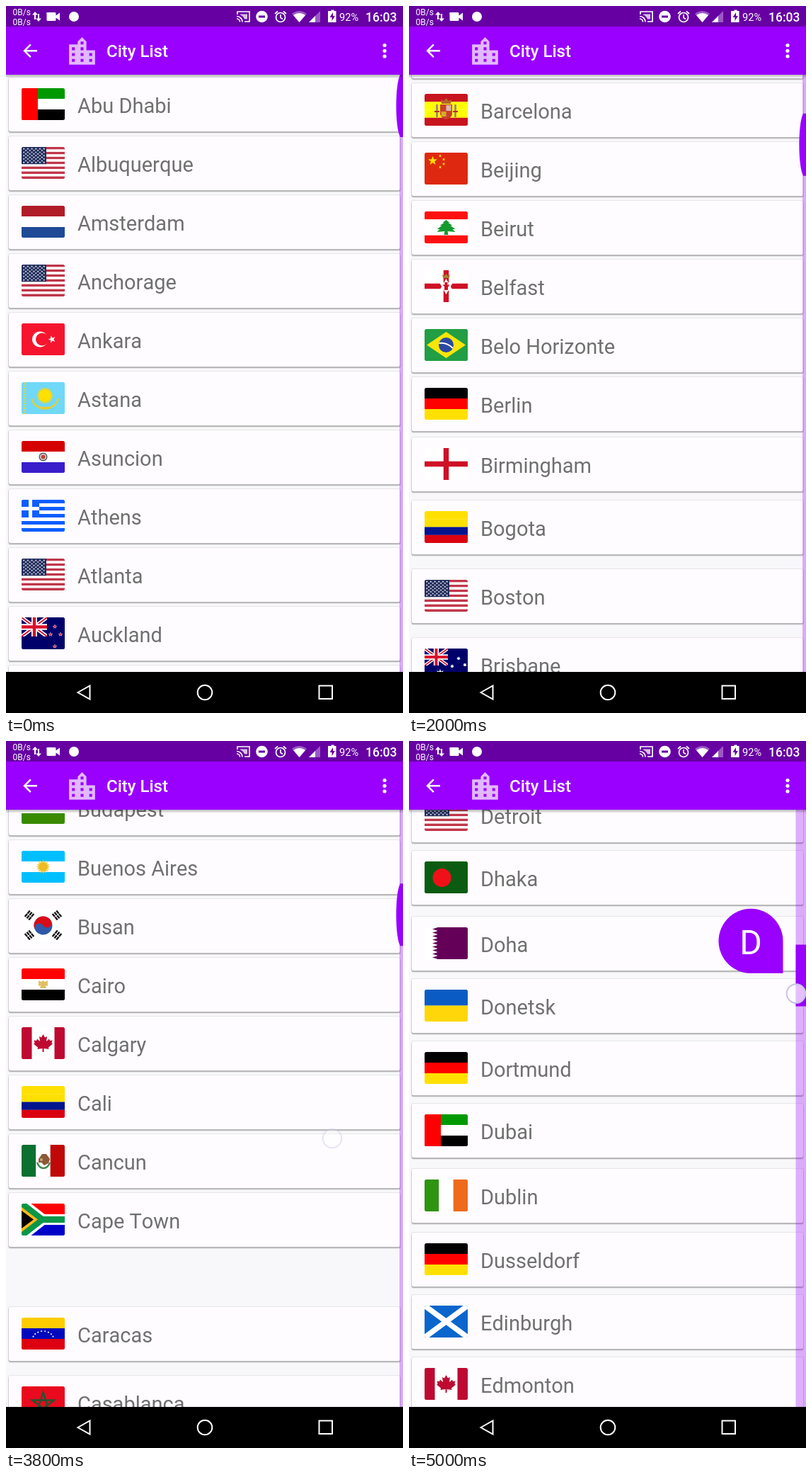
Recreate the animation shown at these times as an HTML page. Size 561 by 998 pixels, loop 5100 ms.

```html
<!DOCTYPE html>
<html lang="en">
<head>
<meta charset="utf-8">
<title>City List</title>
<style>
html, body { margin: 0; width: 100%; height: 100%; overflow: hidden; background: #f8f7f9; }
svg { display: block; }
#stage { width: 561px; height: 998px; }
text { font-family: Roboto, sans-serif; font-kerning: none; }
</style>
</head>
<body>
<svg id="stage" viewBox="0 0 561 998">
  <defs>
    <clipPath id="flagClip"><rect width="61" height="45" rx="2.5"/></clipPath>
    <linearGradient id="barShade" x2="0" y2="1">
      <stop stop-color="#000" stop-opacity=".28"/><stop offset="1" stop-color="#000" stop-opacity="0"/>
    </linearGradient>
  </defs>
  <rect width="561" height="998" fill="#f8f7f9"/>
  <g id="list"></g>
  <rect id="track" y="97" height="843" fill="#9900ff" opacity=".31"/>
  <path id="handle" fill="#9900ff"/>
  <g id="bubble">
    <path d="M91 91H45.5A45.5 45.5 0 1 1 91 45.5z" fill="#9900ff"/>
    <text id="letter" x="45.5" y="64" font-size="48" fill="#fff" text-anchor="middle"></text>
  </g>
  <circle id="touch" r="13.3" fill="#fff" fill-opacity=".75" stroke="#c9c0e6" stroke-width="2"/>

  <rect y="97" width="561" height="5" fill="url(#barShade)"/>
  <rect width="561" height="29" fill="#6600a3"/>
  <rect y="29" width="561" height="68" fill="#9900ff"/>
  <g fill="#fff">
    <g font-size="12"><text x="9.5" y="13">0B/s</text><text x="9.5" y="27">0B/s</text></g>
    <path d="M41 8l4 4.500h-3V19h-2v-6.500h-3zM46 22l-4-4.500h3V11h2v6.500h3z"/>
    <path d="M59 9h10a1.500 1.500 0 0 1 1.500 1.500v3l5.500-4v11l-5.500-4v3a1.500 1.500 0 0 1-1.500 1.500H59a1.500 1.500 0 0 1-1.500-1.500v-8A1.500 1.500 0 0 1 59 9z"/>
    <circle cx="96" cy="15" r="7"/>
    <g fill="none" stroke="#fff" stroke-width="1.7">
      <path d="M327 12V8h17v14h-7M326 14.500a8 8 0 0 1 8 8M326 18a4.500 4.500 0 0 1 4.500 4.500"/>
      <circle cx="388" cy="16" r="6.500"/><path d="M388 12v4.500l3 2M380 11l4-3.500M396 11l-4-3.500"/>
    </g>
    <path d="M331 11.500h10v7h-4a11 11 0 0 0-6-6z" opacity=".75"/>
    <circle cx="361.500" cy="15" r="8.300"/><rect x="357" y="13.500" width="9" height="3" fill="#6600a3"/>
    <path d="M404 11q10.500-8 21 0L414.500 23z" opacity=".35"/><path d="M406 13q8.500-6 17 0l-8.500 10z"/>
    <path d="M444 7v16h-16z" opacity=".35"/><path d="M437 14v9h-9z"/>
    <path d="M458 7h1.500V5.500h4V7h3v16H455V7z"/><path d="M462 9l-4.500 7h3v5l4.500-7h-3z" fill="#6600a3"/>
    <text x="471" y="20.500" font-size="14.600">92%</text>
    <text x="508" y="21.500" font-size="17.500" font-weight="500">16:03</text>
    <path d="M44 62v2.400H29l6.700 6.800-1.700 1.700L24.300 63.200 34 53.500l1.700 1.700L29 62z"/>
    <path transform="translate(83 40) scale(2.040)" opacity=".72" d="M15 11V5l-3-3-3 3v2H3v14h18V11zM7 19H5v-2h2zm0-4H5v-2h2zm0-4H5V9h2zm6 8h-2v-2h2zm0-4h-2v-2h2zm0-4h-2V9h2zm0-4h-2V5h2zm6 12h-2v-2h2zm0-4h-2v-2h2z"/>
    <text x="142" y="71.500" font-size="24" font-weight="500">City List</text>
    <circle cx="535" cy="55.500" r="2.600"/><circle cx="535" cy="63.300" r="2.600"/><circle cx="535" cy="71" r="2.600"/>
  </g>
  <rect y="940" width="561" height="58"/>
  <g fill="none" stroke="#fff" stroke-width="2">
    <path d="M101.500 969L118.500 959.500v19z"/><circle cx="281" cy="969" r="10.300"/><rect x="442.500" y="959.500" width="18.500" height="18.500"/>
  </g>
</svg>
<script>
const $ = id => document.getElementById(id);
const W = 61, H = 45;

// Drawing helpers for flags on a 61 x 45 field
const rect = (x, y, w, h, fill) => `<rect x="${x}" y="${y}" width="${w}" height="${h}" fill="${fill}"/>`;
const disc = (x, y, r, fill) => `<circle cx="${x}" cy="${y}" r="${r}" fill="${fill}"/>`;
const path = (d, fill) => `<path d="${d}" fill="${fill}"/>`;
const line = (d, color, width, dash = 'none') => `<path d="${d}" fill="none" stroke="${color}" stroke-width="${width}" stroke-dasharray="${dash}"/>`;
const rows = (...c) => c.map((f, i) => rect(0, i * H / c.length, W, H / c.length + .1, f)).join('');
const cols = (...c) => c.map((f, i) => rect(i * W / c.length, 0, W / c.length + .1, H, f)).join('');
const repeat = (n, fn) => Array.from({ length: n }, (_, i) => fn(i)).join('');
const stripes = (n, a, b) => rows(...Array.from({ length: n }, (_, i) => i % 2 ? b : a));
function star(x, y, r, fill, points = 5, inner = .4, turn = -90) {
  const d = repeat(points * 2, i => {
    const a = turn * Math.PI / 180 + i * Math.PI / points, k = i % 2 ? r * inner : r;
    return `${i ? 'L' : 'M'}${(x + k * Math.cos(a)).toFixed(2)} ${(y + k * Math.sin(a)).toFixed(2)}`;
  });
  return path(d + 'z', fill);
}
const crescent = bg => disc(26, 22.5, 11, '#fff') + disc(29, 22.5, 9, bg);
const jack = (w, h) => `<svg width="${w}" height="${h}" viewBox="0 0 36 26" preserveAspectRatio="none">` +
  rect(0, 0, 36, 26, '#00006a') + line('M0 0L36 26M36 0L0 26', '#fff', 5) + line('M0 0L36 26M36 0L0 26', '#d8102c', 1.8) +
  line('M18 0V26M0 13H36', '#fff', 8) + line('M18 0V26M0 13H36', '#d8102c', 4.4) + '</svg>';
const cross = line('M30.5 0V45M0 22.5H61', '#ce1126', 7.5);
const trigram = (x, y, turn) => `<g transform="translate(${x} ${y}) rotate(${turn})">` +
  line('M-5.500 -3.600H5.500M-5.500 0H5.500M-5.500 3.600H5.500', '#111', 2.4) + line('M0 -5V5', '#fff', .9) + '</g>';
const leaf = 'M30.500 10l2.500 4.500 3-1.500-1 7 4-3.500 1 2.500 3.500-.5-1 4 1.500 1-6 5 .5 2.500-7-1v5h-2v-5l-7 1 .5-2.500-6-5 1.500-1-1-4 3.500.5 1-2.500 4 3.500-1-7 3 1.500z';
const yellow = '#ffe000', gold = '#d9a92c';

const flags = {
  ae: rows('#090', '#fff', '#000') + rect(0, 0, 23, H, '#f00'),
  us: stripes(13, '#c0364a', '#fff') + rect(0, 0, 35, 24.2, '#25305f') +
    repeat(9, r => repeat(6 - r % 2, c => star(3.2 + c * 5.7 + r % 2 * 2.85, 2.6 + r * 2.4, 1.5, '#fff'))),
  nl: rows('#b01c28', '#fff', '#1e4a96'),
  tr: rows('#f5152e') + crescent('#f5152e') + star(43, 22.5, 5.5, '#fff', 5, .4, 180),
  kz: rows('#70d8f8') + star(33, 19, 12, '#f0d820', 24, .75) + disc(33, 19, 8.3, '#ffe000') +
    line('M14 23Q18 37 33 36Q48 37 52 23M18 31Q33 44 48 31', '#e2cf3a', 2.4) + line('M4.500 1V45', '#d8d25a', 3.5, '2 1.500'),
  py: rows('#d50000', '#fff', '#3a1ecb') + disc(30.5, 22.5, 6, '#555') + disc(30.5, 22.5, 4.6, '#dcd6d0') + disc(30.5, 22.5, 3, '#c0443c'),
  gr: stripes(9, '#0d5eff', '#fff') + rect(0, 0, 25, 25, '#0d5eff') + line('M12.500 0V25M0 12.500H25', '#fff', 5),
  nz: rows('#00006a') + jack(36, 27) + [[47, 13], [41, 24], [55, 24], [47, 41]].map(([x, y]) => star(x, y, 3.4, '#fff') + star(x, y, 2.3, '#e0203c')).join(''),
  az: rows('#1098cf', '#d9283a', '#0b9a3a') + crescent('#d9283a') + star(43, 22.5, 6.5, '#fff', 8, .55),
  th: rows('#c8102e', '#fff', '#241d4f', '#241d4f', '#fff', '#c8102e'),
  es: rows('#c8141e', '#ff0', '#ff0', '#c8141e') + rect(16, 15, 3, 18, '#a88a78') + rect(42, 15, 3, 18, '#a88a78') +
    path('M22 15H39V29Q37 35 30.500 36Q24 35 22 29z', '#c8402c') + rect(30.5, 16, 7, 8, '#d9b8b0') + rect(23.5, 25, 7, 7, gold) +
    path('M24 14l-1-6 4 2 3.500-4 3.500 4 4-2-1 6z', '#b5642c') + line('M14 25H21M40 25H47', '#b03030', 2),
  cn: rows('#de2910') + star(11.5, 11.5, 6.8, yellow) + [[22, 4.5], [27, 9.5], [27, 16], [22, 20.5]].map(([x, y]) => star(x, y, 2.4, yellow)).join(''),
  lb: rows('#ff1010', '#fff', '#fff', '#ff1010') +
    path('M30.500 12l5 4h-2l6 4h-3l7 5h-4l4 4-11-1 1 5h-6l1-5-11 1 4-4h-4l7-5h-3l6-4h-2z', '#149a2e'),
  ni: rows('#fff') + cross + star(30.5, 23, 11, '#fff', 6, .57) + path('M28 28v-5l-2-2 1-1 1.500 1V17h4v4l2-1 .5 1-2 3v4z', '#ce1126') + path('M26 11l-1-5 3 2 2.500-3 2.500 3 3-2-1 5z', '#a5822c'),
  br: rows('#229e45') + path('M30.500 4L58 22.500 30.500 41 3 22.500z', '#f8e509') + disc(30.5, 22.5, 10.5, '#2b49a3') + line('M20.500 20Q31 18 40 27', '#fff', 2),
  de: rows('#000', '#f00', '#ffe000'),
  en: rows('#fff') + cross,
  co: rows('#ffe000', '#ffe000', '#00148e', '#da0010'),
  au: rows('#00006a') + jack(33, 24) + star(22, 35, 6.3, '#fff', 7, .45) + [[48, 14], [39, 25], [57, 23], [48, 41]].map(([x, y]) => star(x, y, 2.9, '#fff', 7, .5)).join(''),
  be: cols('#000', '#ffd90c', '#f5142f'),
  ro: cols('#0036a3', '#ffd90c', '#de2110'),
  hu: rows('#d43516', '#fff', '#388b00'),
  ar: rows('#00bfff', '#fff', '#00bfff') + star(30.5, 22.5, 10, '#f0c93c', 16, .65) + disc(30.5, 22.5, 5.5, '#ecbc20'),
  kr: rows('#fff') + '<g transform="rotate(-33 30.5 22.5)">' + disc(30.5, 22.5, 13, '#2f5aa8') +
    path('M17.500 22.500a13 13 0 0 1 26 0a6.500 6.500 0 0 1-13 0a6.500 6.500 0 0 0-13 0z', '#d80c18') + '</g>' +
    trigram(11, 8, -50) + trigram(50, 8, 50) + trigram(11, 36, 50) + trigram(50, 36, -50),
  eg: rows('#f00', '#fff', '#000') + path('M24 17l4 2 2.500-2 2.500 2 4-2v8l-3-1 1 4H26l1-4-3 1z', '#e2c060'),
  ca: rows('#fff') + rect(0, 0, 14.5, H, '#be0a32') + rect(46.5, 0, 14.5, H, '#be0a32') + path(leaf, '#be0a32'),
  mx: cols('#0b7030', '#fff', '#c00808') + line('M22 25Q25 33 31 33Q37 33 40 25', '#3e8a50', 2.4) +
    path('M24 20l5-7 6 0 5 7-2 6-6 3-4-4-4 0z', '#8b5a38') + disc(28, 21, 2, '#c8a878'),
  za: rows('#f00', '#fff', '#0000c8') + line('M0 -1L30 22.500L0 46M28 22.500H61', '#fff', 15) +
    line('M0 0L29 22.500L0 45M27 22.500H61', '#0b9648', 9) + path('M0 5L23 22.500 0 40z', '#ffb81c') + path('M0 10L17 22.500 0 35z', '#000'),
  ve: rows('#fc0', '#0008bd', '#de0010') + repeat(8, i => {
    const a = Math.PI * (1.12 + i * .109);
    return star(30.5 + 15 * Math.cos(a), 31 + 12 * Math.sin(a), 1.7, '#fff');
  }),
  ma: rows('#ea0a1e') + line('M30.500 8.500L40 38 15 19.500H46L21 38z', '#25522e', 2.5),
  dk: rows('#c8102e') + line('M22 0V45M0 22.500H61', '#fff', 6.5),
  bd: rows('#0b5c12') + disc(24.5, 23, 13, '#f01018'),
  qa: rows('#fff') + rect(18, 0, 43, H, '#650058') + repeat(9, i => path(`M19 ${i * 5}L11 ${i * 5 + 2.5}L19 ${i * 5 + 5}z`, '#650058')),
  ua: rows('#0a5cc4', '#ffd60a'),
  ie: cols('#2f9410', '#fff', '#ee6a1c'),
  sc: rows('#0a66cc') + line('M0 0L61 45M61 0L0 45', '#fff', 7.5)
};

const cities = `Abu Dhabi-ae,Albuquerque-us,Amsterdam-nl,Anchorage-us,Ankara-tr,Astana-kz,Asuncion-py,Athens-gr,
Atlanta-us,Auckland-nz,Austin-us,Baku-az,Baltimore-us,Bangkok-th,Barcelona-es,Beijing-cn,Beirut-lb,Belfast-ni,
Belo Horizonte-br,Berlin-de,Birmingham-en,Bogota-co,Boston-us,Brisbane-au,Brussels-be,Bucharest-ro,Budapest-hu,
Buenos Aires-ar,Busan-kr,Cairo-eg,Calgary-ca,Cali-co,Cancun-mx,Cape Town-za,Caracas-ve,Casablanca-ma,Changzhou-cn,
Charlotte-us,Chengdu-cn,Chicago-us,Chongqing-cn,Cleveland-us,Cologne-de,Columbus-us,Copenhagen-dk,Dalian-cn,
Dallas-us,Denver-us,Detroit-us,Dhaka-bd,Doha-qa,Donetsk-ua,Dortmund-de,Dubai-ae,Dublin-ie,Dusseldorf-de,
Edinburgh-sc,Edmonton-ca`.split(',').map(s => s.trim().split('-'));

$('list').innerHTML = cities.map(([name, flag]) => '<g>' +
  `<rect x="3" y="-1" width="555" height="80" rx="3" opacity=".07"/><rect x="3.500" y="1" width="554" height="77" rx="3" opacity=".2"/>
  <rect x="4" width="553" height="76" rx="2.500" fill="#fefcff"/>
  <g transform="translate(22 15)" clip-path="url(#flagClip)">${flags[flag]}</g>
  <text x="101" y="49.500" font-size="29" fill="#707070">${name}</text></g>`).join('');
const cards = [...$('list').children];

// Scroll path: drags and flings as time / distance pairs
const times = [0, 500, 600, 700, 783, 837, 900, 1000, 1100, 1200, 1350, 1500, 1560, 1613, 1676, 1760, 1820, 2000, 2200, 2350, 2450, 2500,
  2595, 2750, 2900, 2965, 3000, 3100, 3250, 3600, 3748, 3782, 3800, 3872, 3918, 3997, 4200, 4350, 4500, 4630, 4677, 4742, 4809, 4842, 4865, 4896, 5000];
const scrolls = [0, 0, 6, 28, 72, 155, 318, 480, 590, 660, 700, 720, 760, 819, 902, 985, 1068, 1154, 1190, 1200, 1320, 1420,
  1566, 1610, 1622, 1649, 1802, 1890, 1925, 1940, 1981, 2064, 2202, 2230, 2313, 2396, 2467, 2480, 2600, 3143, 3226, 3309, 3558, 3641, 3724, 3890, 4021];
function interpolate(x, xs, ys) {
  let i = 1;
  while (i < xs.length - 1 && xs[i] < x) i++;
  const k = (x - xs[i - 1]) / (xs[i] - xs[i - 1]);
  return ys[i - 1] + (ys[i] - ys[i - 1]) * Math.min(1, k);
}
const scrollAt = t => interpolate(t, times, scrolls);

const LOOP = 5100, STEP = 100, PITCH = 83, SLIDE = 450, SCRUB = 4500;
// Each row slides up once its slot reaches the bottom of the list
const entries = cities.map((_, i) => {
  const s = i * PITCH - 841;
  return s <= 0 ? -SLIDE : interpolate(s, scrolls, times);
});
// Finger drags: start, end, x, final y
const drags = [[500, 790, 450, 540], [1520, 1680, 450, 555], [2360, 2540, 450, 550], [2880, 3000, 448.5, 550], [3600, 3740, 461, 561]];

function placeTouch(t, handleY) {
  const drag = drags.find(d => t >= d[0] && t < d[1] + 100);
  let x = 547, y = handleY + 69, opacity = t >= SCRUB ? 1 : 0;
  if (drag) {
    const [, end, dragX, endY] = drag;
    x = dragX;
    y = endY + scrollAt(end) - scrollAt(Math.min(t, end));
    opacity = Math.min(1, 1 - (t - end) / 100);
  }
  $('touch').setAttribute('transform', `translate(${x} ${y})`);
  $('touch').setAttribute('opacity', opacity);
}

function draw() {
  const t = Math.floor(performance.now() % LOOP / STEP) * STEP;
  const scroll = scrollAt(t), handleY = 97 + scroll / 21.1, scrubbing = t >= SCRUB;
  cards.forEach((card, i) => {
    const p = Math.max(0, Math.min(1, (t - entries[i]) / SLIDE));
    const y = 101 + i * PITCH - scroll + 100 * (1 - p) ** 2;
    card.setAttribute('transform', `translate(0 ${Math.round(y)})`);
    card.style.display = y > 0 && y < 945 ? '' : 'none';
  });
  const trackX = scrubbing ? 546.5 : 556;
  $('track').setAttribute('x', trackX);
  $('track').setAttribute('width', 561 - trackX);
  $('handle').setAttribute('transform', `translate(0 ${handleY})`);
  $('handle').setAttribute('d', scrubbing ? 'M546.5 0H561V87H546.5z' : 'M561 0H557C549.5 14 549.5 74 557 88H561z');
  $('bubble').style.display = scrubbing ? '' : 'none';
  $('bubble').setAttribute('transform', `translate(437.5 ${handleY - 50.7})`);
  $('letter').textContent = cities[Math.min(cities.length - 1, Math.floor(scroll / PITCH))][0][0];
  placeTouch(t, handleY);
  requestAnimationFrame(draw);
}
draw();
</script>
</body>
</html>
```
